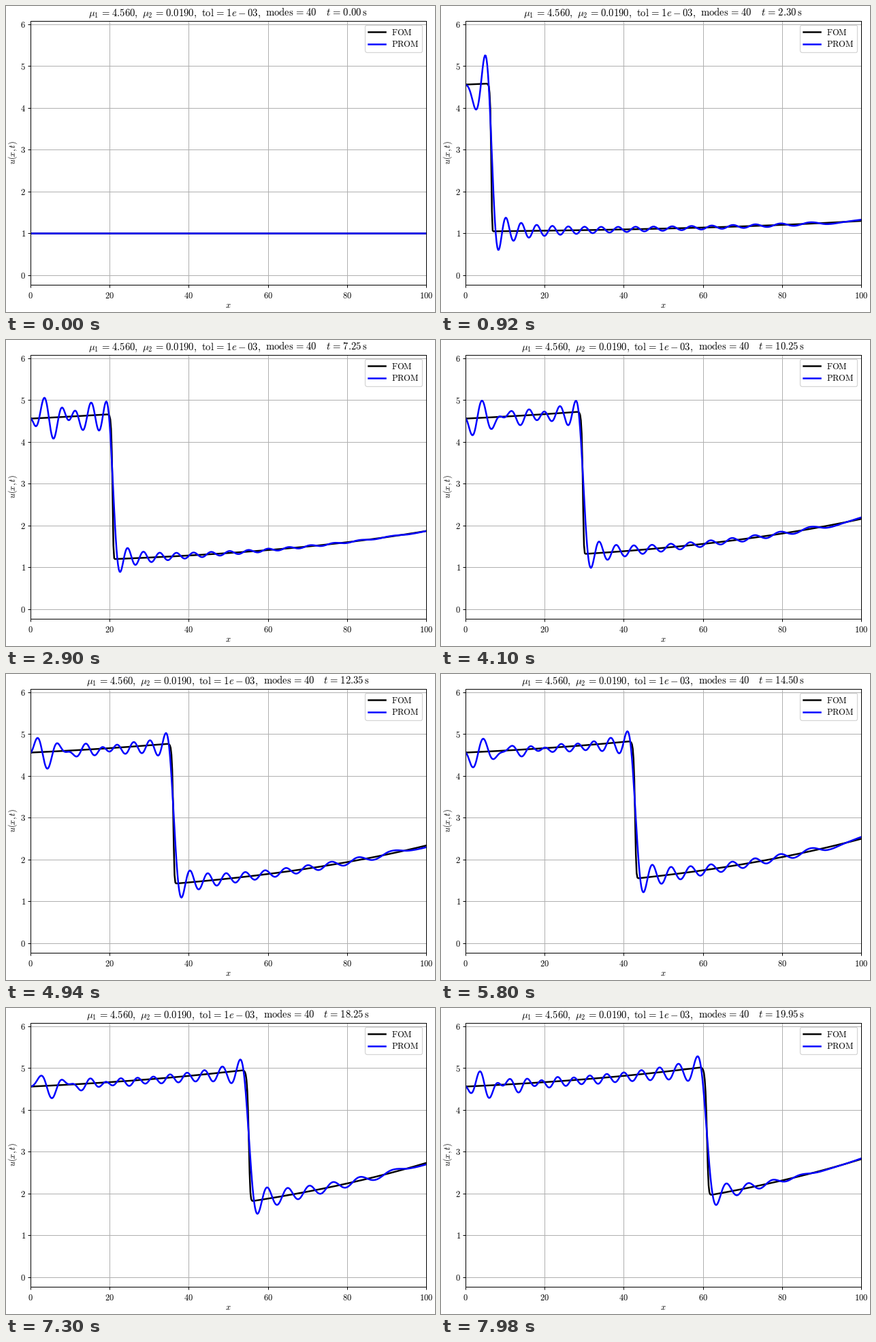
A matplotlib script that plays this animation: 630x450 px, repeating every 8000 ms.

```python
import numpy as np
import matplotlib.pyplot as plt
from matplotlib.animation import FuncAnimation

W, H, DPI = 630, 450, 90
FRAMES, INTERVAL = 400, 20
N, STEPS, DT, MODES = 512, 500, 0.05, 40
MU1, MU2 = 4.56, 0.019
UPWIND = 0.1  # small share of upwinding added to the linear elements

x = np.linspace(0, 100, N)
dx = x[1]
lam = DT / dx


def forcing(mu2):
    src = DT * 0.02 * np.exp(mu2 * x)
    src[-1] /= 2
    return src


def burgers_system(u, prev, src, inlet):
    """Tridiagonal Jacobian (lower, diag, upper) and residual of one implicit step."""
    a, b = u[..., :-1], u[..., 1:]
    flux = (a * a + a * b + b * b) / 6 - UPWIND * (b * b - a * a) / 4
    fa = (2 * a + b) / 6 + UPWIND * a / 2
    fb = (2 * b + a) / 6 - UPWIND * b / 2
    dv = u - prev

    low, diag, up = np.zeros_like(u), np.zeros_like(u), np.zeros_like(u)
    low[..., 1:] = 1 / 6 - lam * fa
    up[..., :-1] = 1 / 6 + lam * fb
    diag[..., :-1] = 1 / 3 + lam * fa
    diag[..., 1:] += 1 / 3 - lam * fb
    diag[..., -1] += lam * u[..., -1]

    res = -src
    res[..., :-1] += dv[..., :-1] / 3 + dv[..., 1:] / 6 + lam * flux
    res[..., 1:] += dv[..., 1:] / 3 + dv[..., :-1] / 6 - lam * flux
    res[..., -1] += lam * u[..., -1] ** 2 / 2

    up[..., 0] = 0
    diag[..., 0] = 1
    res[..., 0] = u[..., 0] - inlet
    return low, diag, up, res


def solve_tridiagonal(a, b, c, d):
    """Parallel cyclic reduction along the last axis."""
    k = 1
    while k < N:
        lo = -a[:, k:] / b[:, :-k]
        hi = -c[:, :-k] / b[:, k:]
        na, nb, nc, nd = np.zeros_like(a), b.copy(), np.zeros_like(c), d.copy()
        na[:, k:] = lo * a[:, :-k]
        nc[:, :-k] = hi * c[:, k:]
        nb[:, k:] += lo * c[:, :-k]
        nb[:, :-k] += hi * a[:, k:]
        nd[:, k:] += lo * d[:, :-k]
        nd[:, :-k] += hi * d[:, k:]
        a, b, c, d = na, nb, nc, nd
        k *= 2
    return d / b


def solve_full(params):
    inlet = np.array([m1 for m1, _ in params])
    src = np.array([forcing(m2) for _, m2 in params])
    out = np.ones((len(params), STEPS + 1, N))
    for n in range(1, STEPS + 1):
        prev = out[:, n - 1]
        u = prev.copy()
        for _ in range(10):
            low, diag, up, res = burgers_system(u, prev, src, inlet)
            du = solve_tridiagonal(low, diag, up, -res)
            u += du
            if np.abs(du).max() < 1e-3:
                break
        out[:, n] = u
    return out


def pod_basis(snaps):
    _, vecs = np.linalg.eigh(snaps.T @ snaps)
    return np.ascontiguousarray(vecs[:, ::-1][:, :MODES])


def solve_reduced(basis):
    """Least-squares Petrov-Galerkin time stepping with Gauss-Newton."""
    src = forcing(MU2)
    out = np.ones((FRAMES, N))
    q = basis.T @ out[0]
    for n in range(1, FRAMES):
        u = basis @ q
        for _ in range(8):
            low, diag, up, res = burgers_system(u, out[n - 1], src, MU1)
            jac = diag[:, None] * basis
            jac[1:] += low[1:, None] * basis[:-1]
            jac[:-1] += up[:-1, None] * basis[1:]
            jac[0] /= dx
            res[0] /= dx
            dq = np.linalg.solve(jac.T @ jac, -jac.T @ res)
            q = q + dq
            u = basis @ q
            if np.linalg.norm(dq) < 1e-5 * np.linalg.norm(q):
                break
        out[n] = u
    return out


training = [(m1, m2) for m1 in (4.25, 4.875, 5.5) for m2 in (0.015, 0.0225, 0.03)]
runs = solve_full(training + [(MU1, MU2)])
fom = runs[-1]
prom = solve_reduced(pod_basis(runs[:-1].reshape(-1, N)))

plt.rcParams.update({
    "font.family": "Liberation Serif",
    "mathtext.fontset": "cm",
    "font.size": 10,
})
fig = plt.figure(figsize=(W / DPI, H / DPI), dpi=DPI, facecolor="white")
ax = fig.add_axes([36.1 / W, 1 - 410.1 / H, 580.8 / W, 387.9 / H])
ax.set_xlim(0, 100)
ax.set_ylim(-0.2294, 6.0779)
xt, yt = range(0, 101, 20), range(7)
ax.set_xticks(xt, [f"${v}$" for v in xt])
ax.set_yticks(yt, [f"${v}$" for v in yt])
ax.tick_params(axis="x", pad=4.3)
ax.tick_params(axis="y", pad=2.3)
ax.grid(True)

fom_line, = ax.plot(x, fom[0], color="black", lw=2, label=r"$\mathrm{FOM}$")
prom_line, = ax.plot(x, prom[0], color="blue", lw=2, label=r"$\mathrm{PROM}$")
ax.legend(loc="upper right", labelspacing=0.34, borderpad=0.38,
          handletextpad=0.7, borderaxespad=0.46)


def label(px, py, text, **kw):
    return fig.text(px / W, 1 - py / H, text, **kw)


label(326.5, 443.5, "$x$", ha="center", va="baseline")
label(10.5, 216, "$u(x,t)$", ha="center", va="center", rotation=90)

EQ = r"\hspace{0.117}=\hspace{0.117}"
TITLE = [
    (121.3, rf"$\mu_1{EQ}4.560,$"),
    (200.4, rf"$\mu_2{EQ}0.0190,$"),
    (286.6, rf"$\mathrm{{tol}}{EQ}1e-03,$"),
    (381.3, rf"$\mathrm{{modes}}{EQ}40$"),
    (470.1, ""),
]
parts = [label(px, 14.5, s, ha="left", va="baseline", fontsize=11.75)
         for px, s in TITLE]


def update(n):
    t = n * DT
    clock = f"{t:.2f}"
    shift = 3.7 * (len(clock) - 4)  # the centred title grows by one digit
    for part, (px, _) in zip(parts, TITLE):
        part.set_x((px - shift) / W)
    parts[-1].set_text(rf"$t{EQ}{clock}\hspace{{0.19}}\mathrm{{s}}$")
    fom_line.set_ydata(fom[n])
    prom_line.set_ydata(prom[n])
    return fom_line, prom_line, *parts


anim = FuncAnimation(fig, update, frames=FRAMES, interval=INTERVAL,
                     init_func=lambda: update(0), repeat=True, repeat_delay=0)
plt.show()
```
